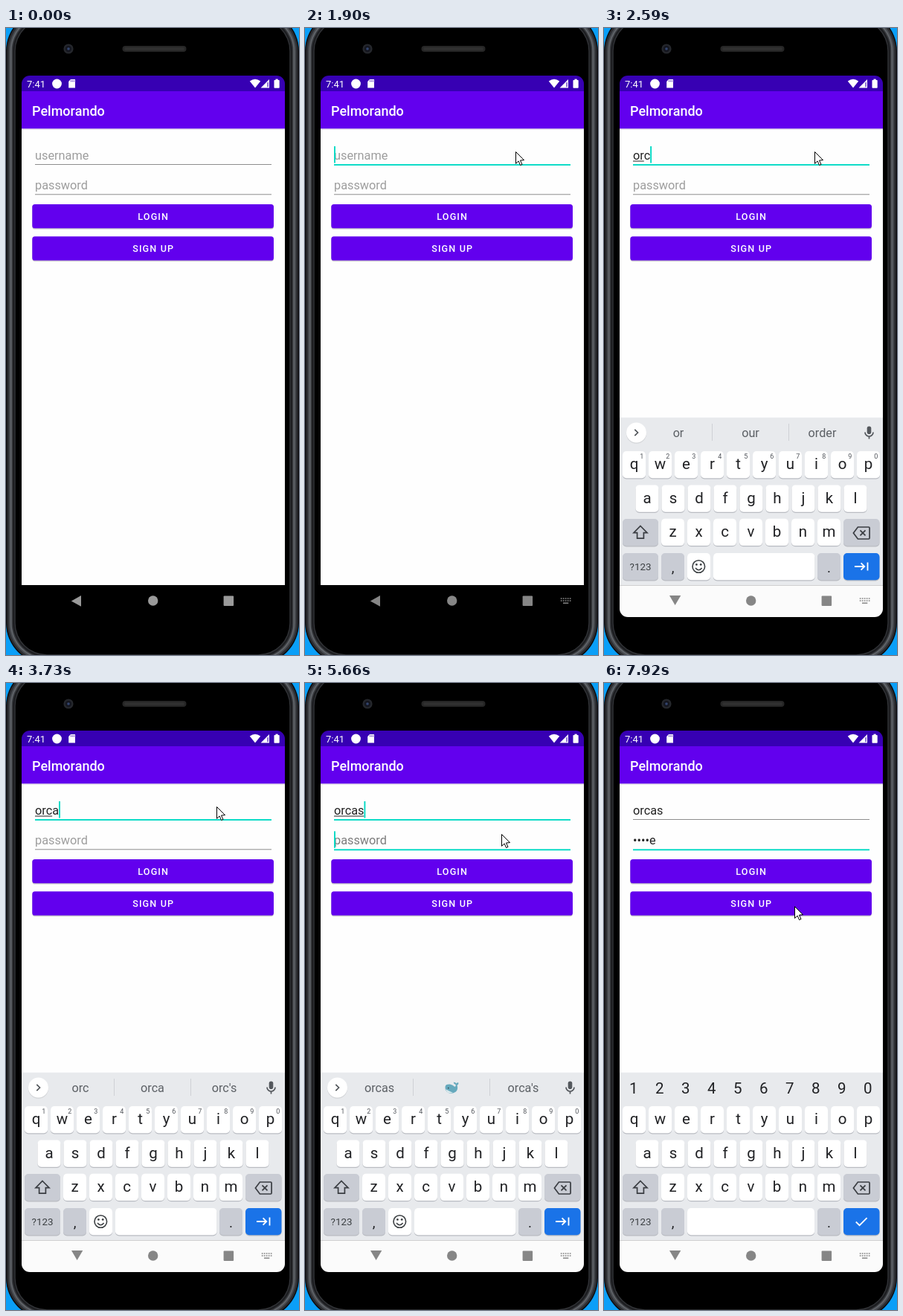
An HTML page with a canvas for the animation above (8 s loop, 394 by 843 pixels).

```html
<!DOCTYPE html>
<html lang="en">
<head>
<meta charset="utf-8">
<title>Login screen</title>
<style>
html, body { margin: 0; width: 100%; height: 100%; overflow: hidden; background: #0a9ff8; }
canvas { display: block; width: 394px; height: 843px; }
</style>
</head>
<body>
<canvas id="stage"></canvas>
<script>
const W = 394, H = 843, LOOP = 8000;
const canvas = document.getElementById('stage');
const dpr = window.devicePixelRatio || 1;
canvas.width = W * dpr;
canvas.height = H * dpr;
const g = canvas.getContext('2d');
g.scale(dpr, dpr);

const PURPLE = '#6200ee', TEAL = '#03dac5', INK = '#202124', GREY = '#54585d';
const FONT = 'Roboto, "Noto Sans", sans-serif';

// Each entry changes part of the state from its time on.
const start = {
  pointer: null, focus: '', caret: false, user: '', marked: 0, pass: '',
  hint: '#9d9d9d', words: null, board: '', nav: 'dark'
};
const events = [
  [720, { pointer: [376, 128] }],
  [850, { pointer: [320, 149] }],
  [990, { pointer: [308, 156] }],
  [1140, { pointer: [292, 162] }],
  [1260, { pointer: [283, 166] }],
  [1540, { focus: 'user' }],
  [1660, { caret: true }],
  [1900, { nav: 'dim' }],
  [2020, { board: 'tools', pressed: true, nav: 'turn' }],
  [2140, { pressed: false, nav: 'light' }],
  [2290, { user: 'or' }],
  [2440, { marked: 2, words: ['or', 'our', 'order'] }],
  [2590, { user: 'orc' }],
  [2720, { marked: 3, words: ['orc', 'orca', "orc's"] }],
  [3290, { caret: false }],
  [3730, { user: 'orca', caret: true }],
  [3980, { marked: 4, words: ['orca', 'orcas', "orca's"] }],
  [4100, { user: 'orcas' }],
  [4380, { marked: 5, words: ['orcas', '', "orca's"] }],
  [4810, { caret: false }],
  [4960, { pointer: [276, 186] }],
  [5110, { pointer: [268, 198] }],
  [5230, { pointer: [264, 203] }],
  [5350, { caret: true }],
  [5660, { focus: 'both', hint: '#7c7c7c' }],
  [5780, { focus: 'pass', marked: 0, hint: '#9d9d9d' }],
  [5900, { board: 'digits' }],
  [6020, { pass: 's' }],
  [6140, { pass: '•h' }],
  [6540, { pass: '••a' }],
  [6790, { pass: '•••' }],
  [7070, { pass: '••••e' }],
  [7500, { caret: false, pointer: [262, 222] }],
  [7620, { pointer: [257, 243] }],
  [7770, { pointer: [261, 295] }],
  [7920, { pointer: [256, 300] }]
];

function stateAt(t) {
  const s = { ...start };
  for (const [at, change] of events) if (t >= at) Object.assign(s, change);
  return s;
}

function rect(x, y, w, h, color) {
  g.fillStyle = color;
  g.fillRect(x, y, w, h);
}

function round(x, y, w, h, r, color) {
  g.fillStyle = color;
  g.beginPath();
  g.roundRect(x, y, w, h, r);
  g.fill();
}

function disc(x, y, r, color) {
  g.fillStyle = color;
  g.beginPath();
  g.arc(x, y, r, 0, Math.PI * 2);
  g.fill();
}

function poly(points, color) {
  g.fillStyle = color;
  g.beginPath();
  points.forEach(([x, y]) => g.lineTo(x, y));
  g.closePath();
  g.fill();
}

function stroke(path, color, width) {
  g.strokeStyle = color;
  g.lineWidth = width;
  g.stroke(new Path2D(path));
}

function text(str, x, y, size, color, align = 'left', weight = 400, spacing = 0) {
  g.font = `${weight} ${size}px ${FONT}`;
  g.letterSpacing = spacing + 'px';
  g.textAlign = align;
  g.fillStyle = color;
  g.fillText(str, x, y);
  g.letterSpacing = '0px';
}

function widthOf(str) {
  g.font = `400 16.3px ${FONT}`;
  return g.measureText(str).width;
}

function phone() {
  rect(0, 0, W, H, '#0a9ff8');
  const bands = [[0, '#0c0c0e'], [1.5, '#2c2d31'], [4, '#484b50'], [6, '#63676c'],
    [7.5, '#3a3c40'], [9, '#1d1e21'], [11.5, '#34363a'], [12.7, '#000']];
  for (const [d, color] of bands) round(d, -24 + d, W - 2 * d, 879 - 2 * d, 55 - d, color);
  round(156.5, 24, 86, 8, 4, '#262626');
  round(159, 26, 81, 4, 2, '#303030');
  disc(84, 28, 6.6, '#25272c');
  disc(84, 28, 4.2, '#14161f');
  disc(84, 28, 1.8, '#33456f');
}

function statusBar() {
  round(21, 64, 354, 30, [11, 11, 0, 0], '#3700b3');
  text('7:41', 28, 79.5, 13, '#fff');
  disc(68.5, 75, 6.4, '#fff');
  poly([[87, 69], [93, 69], [93, 80.5], [84.2, 80.5], [84.2, 72]], '#fff');
  for (const x of [87, 89, 91]) rect(x, 70.3, 0.8, 2, '#3700b3');
  g.fillStyle = '#fff';
  g.fill(new Path2D('M335 80.5 L327.8 71.6 Q335 66 342.2 71.6 Z'));
  poly([[354, 69], [354, 80.5], [342.6, 80.5]], '#fff');
  poly([[351.5, 73.6], [352.6, 72.5], [352.6, 79.2], [351.5, 79.2]], '#3700b3');
  round(360.5, 70, 7.2, 10.7, 0.8, '#fff');
  rect(362.5, 68.6, 3.2, 2, '#fff');
}

function button(y, label) {
  round(35.3, y + 1, 324.7, 32.5, 3.6, 'rgba(0,0,0,.22)');
  round(35.3, y, 324.7, 32.3, 3.6, PURPLE);
  text(label, 198.2, y + 21, 12.6, '#fff', 'center', 500, 1.13);
}

function field(y, value, hint, hintColor, focused, caret, marked) {
  if (focused) rect(39, y + 6, 318, 1.9, TEAL);
  else rect(39, y + 6, 318, 1, '#8d8d8d');
  text(value || hint, 39, y, 16.3, value ? '#222' : hintColor);
  if (marked) rect(39, y + 1.5, widthOf(value.slice(0, marked)), 1, '#222');
  if (caret) rect(39 + widthOf(value), y - 18, 1.9, 22.5, TEAL);
}

function form(s) {
  rect(21, 85, 354, 664, '#fefefe');
  rect(21, 85, 354, 50.5, PURPLE);
  rect(21, 135.5, 354, 1, '#d6d0de');
  text('Pelmorando', 35, 118, 18, '#fff', 'left', 500);
  const onUser = s.focus === 'user' || s.focus === 'both';
  const onPass = s.focus === 'pass' || s.focus === 'both';
  field(177, s.user, 'username', '#9d9d9d', onUser, onUser && s.caret, s.marked);
  field(217.3, s.pass, 'password', s.hint, onPass, onPass && s.caret, 0);
  button(237, 'LOGIN');
  button(280.3, 'SIGN UP');
}

function key(x, y, w, label, color = '#fff') {
  round(x, y + 1, w, 36.5, 5, '#b9bcc2');
  round(x, y, w, 36.3, 5, color);
  if (label) text(label, x + w / 2, y + 24.3, 20.5, INK, 'center');
}

function mic() {
  round(353.7, 535.5, 5.6, 10.5, 2.8, GREY);
  stroke('M351 543.5 a5.5 5.5 0 0 0 11 0 M356.5 549 v3.6', GREY, 1.7);
}

function chevron(dir) {
  disc(43.5, 545, 13.7, '#d3d5d8');
  disc(43.5, 544, 13.5, '#fff');
  stroke(`M${43.3 - dir * 2} 539.8 l${dir * 4.2} 4.2 l${-dir * 4.2} 4.2`, '#505459', 1.7);
}

function tools(pressed) {
  if (pressed) rect(65, 524, 50.5, 39.5, '#d8dadd');
  chevron(-1);
  stroke('M93.1 541.6 a4.9 4.9 0 1 1 -9.8 0 a4.9 4.9 0 1 1 9.8 0 M91.6 545.2 L97.6 551', GREY, 2);
  stroke('M135.3 537.2 h11.4 q1.2 0 1.2 1.2 v7.4 l-4.8 4.8 h-7.8 q-1.2 0 -1.2 -1.2 v-11 q0 -1.2 1.2 -1.2 M143.1 550.5 v-4.6 h4.7', GREY, 1.5);
  stroke('M136.8 544.8 q2.3 3.3 5 1 M137 540.8 h2.2 M142.8 540.8 h2.2', GREY, 1.4);
  stroke('M187 540 h-5.2 v7 h5.2 v-3.4 h-2.5 M190.7 539.1 v8.8 M194.8 547.9 v-7.9 h6 M194.8 543.8 h4.6', GREY, 2);
  stroke('M236.4 538 h11.6 v13 h-11.6 z M239.2 542.3 h6 M239.2 545.1 h6 M239.2 547.8 h4', GREY, 1.5);
  round(239, 535.8, 6.4, 4, 1, GREY);
  rect(273.5, 533.5, 1, 20, '#cfd1d5');
  for (const x of [299.6, 305.6, 311.6]) disc(x, 544, 1.9, GREY);
  mic();
}

function emoji() {
  g.fillStyle = '#66a9bd';
  g.fill(new Path2D('M188.5 543 Q189 539 195 539.6 Q199 540.3 201.2 542.8 Q203.4 542.5 202.4 539.8 Q200 539.5 199.7 536.8 Q202.5 536.5 203.6 538.5 Q204.4 536.8 206.5 537.5 Q206.8 539.8 204.6 540.7 Q206.3 546.8 202.6 549.8 Q196 554.2 190.6 549.5 Q188.1 546.8 188.5 543'));
  g.fillStyle = '#d8e8ec';
  g.fill(new Path2D('M189 546 Q193.5 548.5 199 550.9 Q193.4 552.6 190.4 549.3 Z'));
  disc(192.8, 544.6, 0.8, '#263238');
}

function suggestions(words) {
  chevron(1);
  [100, 197, 293.5].forEach((x, i) => {
    if (words[i]) text(words[i], x, 550, 16.2, '#5c6065', 'center');
    else emoji();
  });
  rect(145, 532, 1, 23, '#cfd1d5');
  rect(248, 532, 1, 23, '#cfd1d5');
  mic();
}

function keyboard(s) {
  const digits = s.board === 'digits', shade = '#c9ccd4';
  rect(21, 523.7, 354, 226, '#e8eaed');
  if (digits) [...'1234567890'].forEach((d, i) => text(d, 39.8 + i * 35, 551.5, 20.5, INK, 'center'));
  else if (s.words) suggestions(s.words);
  else tools(s.pressed);

  const rows = [['qwertyuiop', 25], ['asdfghjkl', 42.5], ['zxcvbnm', 77]];
  rows.forEach(([letters, x], r) => {
    [...letters].forEach((c, i) => {
      const left = x + i * 35, top = 569 + r * 45.4;
      key(left, top, 31, c);
      if (r === 0 && !digits) text((i + 1) % 10, left + 25.7, 579, 9, '#50545a', 'center');
    });
  });

  key(25, 660, 48, '', shade);
  stroke('M49 669.5 l9 9.2 h-4.6 v7.5 h-8.8 v-7.5 h-4.6 z', '#3a3d42', 1.7);
  key(322, 660, 48.5, '', shade);
  stroke('M341.4 671 h14.4 q1.3 0 1.3 1.3 v13.4 q0 1.3 -1.3 1.3 h-14.4 l-6 -8 z M344.5 675.4 l7 7 M351.5 675.4 l-7 7', '#3a3d42', 1.7);

  key(25, 706, 48, '', shade);
  text('?123', 49, 729.3, 13.4, '#3c4043', 'center');
  key(77, 706, 31, '', shade);
  text(',', 92.7, 731.5, 19, INK, 'center');
  if (digits) key(112, 706, 171, '');
  else {
    key(112, 706, 31, '');
    stroke('M135.6 724 a8.3 8.3 0 1 1 -16.6 0 a8.3 8.3 0 1 1 16.6 0 M123 726 q4.3 5.5 8.6 0', '#3c4043', 1.6);
    disc(124.4, 721.4, 1.4, '#3c4043');
    disc(130.2, 721.4, 1.4, '#3c4043');
    key(147, 706, 136.5, '');
  }
  key(287, 706, 31, '', shade);
  text('.', 302.5, 731.5, 19, INK, 'center');
  key(322, 706, 48.5, '', '#1a73e8');
  if (digits) stroke('M338.8 724.5 l4.8 4.7 l10 -10', '#fff', 1.8);
  else stroke('M337 724 h13 M345.6 719.3 l4.7 4.7 l-4.7 4.7 M354.5 718.5 v11', '#fff', 1.8);
}

function navBar(s) {
  const light = s.nav === 'light' || s.nav === 'turn';
  const color = s.nav === 'dark' ? '#9a9a9a' : '#868686';
  if (light) round(21, 749.5, 354, 42.5, [0, 0, 11, 11], '#fbfbfb');
  if (s.nav === 'turn') poly([[91.5, 761], [104.5, 768.3], [91.5, 775.5]], color);
  else if (light) poly([[88, 763], [103.3, 763], [95.6, 776]], color);
  else poly([[101, 763], [101, 777.8], [87.8, 770.4]], color);
  disc(197.7, 770, 6.7, color);
  round(292.6, 763.4, 13.5, 13.5, 1, color);
  if (s.nav === 'dark') return;
  const tint = light ? '#909090' : '#7c7c7c';
  for (let r = 0; r < 2; r++) {
    for (let i = 0; i < 5; i++) rect(343.8 + i * 3, 766.2 + r * 3, 1.7, 1.7, tint);
  }
  rect(347, 772.4, 7.3, 1.7, tint);
}

function pointer([x, y]) {
  const shape = [[0.5, 0.5], [0.5, 16.3], [4.1, 12.9], [6.6, 18.5], [9, 17.4], [6.5, 12], [11.5, 11.6]];
  poly(shape.map(([a, b]) => [x + a, y + b]), '#fff');
  g.strokeStyle = '#000';
  g.lineWidth = 1;
  g.stroke();
}

function draw(t) {
  const s = stateAt(t);
  phone();
  statusBar();
  form(s);
  if (s.board) keyboard(s);
  navBar(s);
  if (s.pointer) pointer(s.pointer);
}

const begin = performance.now();
function tick() {
  draw((performance.now() - begin) % LOOP);
  requestAnimationFrame(tick);
}
tick();
</script>
</body>
</html>
```
